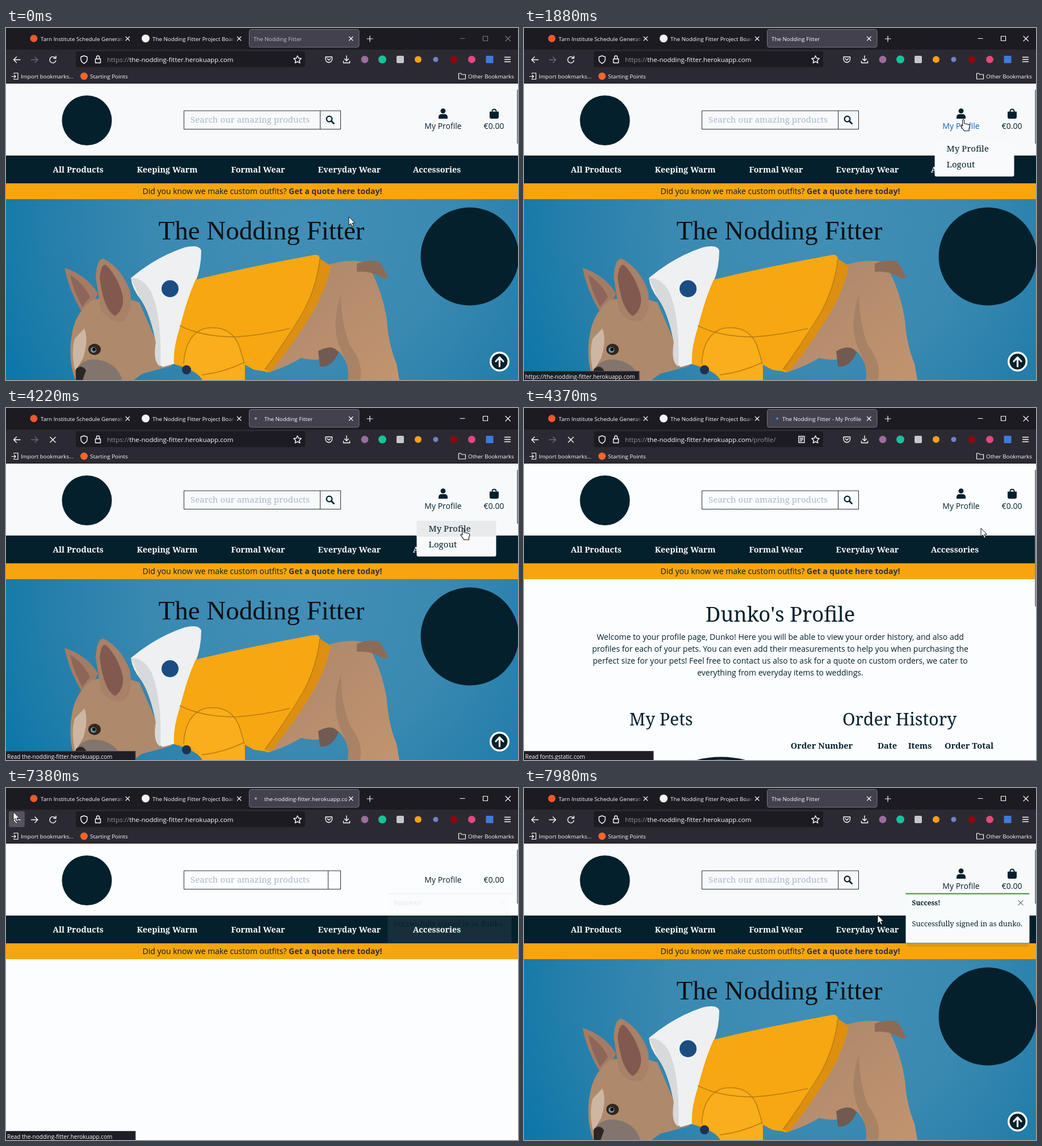
These frames come from a looping animation (902 by 621 pixels, 8000 ms). An HTML page:

```html
<!DOCTYPE html>
<html lang="en">
<head>
<meta charset="utf-8">
<title>Shop visit</title>
<style>
html, body { margin: 0; width: 100%; height: 100%; overflow: hidden; background: #1c1b22; }
svg { display: block; }
text { font: 14px "Open Sans", "Noto Sans", sans-serif; fill: #04202c; white-space: pre; }
.ui text { font-size: 9.8px; fill: #fbfbfe; }
.ui #url { font-size: 11.5px; }
.ui .grey { fill: #92929c; }
.ui #statusText { font-size: 10px; }
.serif text { font-family: "Noto Serif", "Liberation Serif", serif; }
.mid text, text.mid { text-anchor: middle; }
.bold text, .bold { font-weight: 700; }
.line { fill: none; stroke: #fbfbfe; stroke-width: 1.4; stroke-linecap: round; stroke-linejoin: round; }
.thin { stroke-width: 1.2; }
.seam { fill: none; stroke: #bd7c12; stroke-width: 1.5; }
</style>
</head>
<body>
<svg width="902" height="621" viewBox="0 0 902 621">
<defs>
  <radialGradient id="wall" gradientUnits="userSpaceOnUse" cx="520" cy="340" r="590">
    <stop offset="0" stop-color="#428fb6"/><stop offset=".45" stop-color="#3a89b1"/>
    <stop offset=".8" stop-color="#207da9"/><stop offset="1" stop-color="#0a76a9"/>
  </radialGradient>
  <linearGradient id="fur" x1="0" y1="0" x2="1" y2="1">
    <stop offset="0" stop-color="#a9866c"/><stop offset="1" stop-color="#c2946f"/>
  </linearGradient>
  <linearGradient id="fade"><stop offset="0" stop-color="#1c1b22" stop-opacity="0"/><stop offset="1" stop-color="#1c1b22"/></linearGradient>
  <clipPath id="tabClip"><rect x="428" width="173" height="38"/></clipPath>
</defs>

<!-- page -->
<rect id="paper" y="98" width="902" height="523" fill="#f8f9fb"/>
<circle cx="142.5" cy="163" r="44" fill="#04202c"/>
<g fill="none" stroke="#2a3038"><rect x="313.5" y="146" width="276" height="32.5"/><path id="divider" d="M553.5 146v32"/></g>
<g class="serif"><text x="325" y="167" style="font-size:15px;fill:#a9bac8">Search our amazing products</text></g>
<g id="icons" fill="#04202c">
  <circle cx="569.5" cy="160.5" r="4.8" fill="none" stroke="#04202c" stroke-width="2.3"/>
  <path d="M573 164l4.5 4.5" stroke="#04202c" stroke-width="2.8" stroke-linecap="round"/>
  <circle cx="770" cy="146.3" r="4.4"/><path d="M762 160v-2.5q0-5.5 5.5-5.5h5q5.5 0 5.5 5.5v2.5z"/>
  <path d="M852 147.5h16v9.5q0 3-3 3h-10q-3 0-3-3z"/>
  <path d="M856.5 150v-3q0-3.5 3.5-3.5t3.5 3.5v3" fill="none" stroke="#04202c" stroke-width="1.8"/>
</g>
<g id="links" class="mid"><text id="profileLink" x="770" y="178">My Profile</text><text x="859.5" y="178">€0.00</text></g>
<rect y="225" width="902" height="49" fill="#04202c"/>
<g id="nav" class="serif mid bold"></g>
<rect y="274" width="902" height="28" fill="#f7a50e"/>
<text class="mid" x="451.5" y="293">Did you know we make custom outfits? <tspan class="bold" fill="#2b3442">Get a quote here today!</tspan></text>

<g id="hero">
  <rect y="302" width="902" height="319" fill="url(#wall)"/>
  <!-- body -->
  <path d="M560 420Q600 406 632 413L646 434Q664 470 671 515Q674 560 688 592L693 621H602Q607 592 586 570Q556 592 520 582Q490 600 460 608L430 590Z" fill="url(#fur)"/>
  <path d="M590 470Q570 530 592 572Q604 596 602 621H624Q630 590 606 560Q590 520 590 470Z" fill="#98765c" opacity=".5"/>
  <path d="M618 416Q638 407 657 412Q667 424 673 440Q668 445 656 437Q640 428 618 430Z" fill="#8c6b56"/>
  <path d="M550 570Q575 556 586 572Q574 600 553 597Z" fill="#715a52"/>
  <!-- head -->
  <path d="M103 423Q142 436 162 468L150 497L132 498Q110 460 103 423Z" fill="#a47c66"/>
  <path d="M113 435Q138 452 148 475L134 492Q118 462 113 435Z" fill="#8e6659"/>
  <path d="M150 481Q190 468 235 484L268 560L292 596L240 610L225 621H122Q107 580 118 530Q126 500 150 481Z" fill="#ae896c"/>
  <path d="M158 440Q160 406 172 407Q202 422 218 462Q226 500 205 518Q180 520 167 497Z" fill="#a98068"/>
  <path d="M165 440Q168 415 176 418Q198 440 206 474Q208 497 192 508Q172 498 165 440Z" fill="#82594f"/>
  <path d="M138 530Q146 550 136 582L122 606Q114 574 121 548Z" fill="#cdb7a2"/>
  <path d="M122 604Q138 580 165 586Q196 592 205 621H123Z" fill="#83756d"/>
  <path d="M123 602q10-10 18 2l-6 17h-12z" fill="#2c2624"/>
  <ellipse cx="156" cy="567" rx="11" ry="10" fill="#33261f"/><circle cx="154" cy="568" r="5" fill="#6e99a6"/><circle cx="155" cy="567" r="3" fill="#111"/>
  <!-- hood -->
  <path d="M220 441Q264 404 315 387Q341 381 344 393Q344 424 333 450Q318 490 306 530Q295 565 298 592L276 598Q262 590 265 560Q255 505 238 480Q222 460 220 441Z" fill="#eef0f1"/>
  <path d="M220 441Q242 440 256 466Q275 510 272 597Q258 590 264 553Q253 500 235 475Z" fill="#d8d9da"/>
  <circle cx="289" cy="460" r="15" fill="#1c4c82"/>
  <!-- sweater -->
  <path d="M334 444Q420 423 545 400Q552 400 553 407L572 420Q562 470 527 522Q500 565 466 607L437 603L421 594V621H346Q338 605 296 593Q294 565 306 530Q318 480 334 444Z" fill="#f6a712"/>
  <path d="M553 407L572 420Q562 470 527 522Q500 565 466 607L455 602Q500 545 522 505Q548 455 553 407Z" fill="#dc8f10"/>
  <path d="M313 592Q316 541 350 530Q398 522 412 565Q420 590 421 621H346Q336 603 313 592Z" fill="#f9ae1b"/>
  <path class="seam" d="M553 407Q547 460 520 507Q495 548 457 602M313 592Q316 541 350 530Q398 522 412 565L420 592M345 612Q382 608 420 590M306 525Q345 545 405 545Q450 542 500 530"/>
  <circle cx="318" cy="603" r="8" fill="#1c3350"/>
  <text class="mid" x="450" y="373" style="font:47px 'Liberation Serif',serif;fill:#071014">The Nodding Fitter</text>
  <circle cx="817" cy="403" r="86.5" fill="#04202c"/>
  <circle cx="869.5" cy="588.5" r="17.5" fill="#fff"/><circle cx="869.5" cy="588.5" r="14" fill="#04202c"/>
  <path d="M869.5 597v-16m-6.5 7l6.5-7 6.500 7" class="line" style="stroke-width:3.2"/>
</g>

<g id="profile">
  <g class="serif mid">
    <text x="451.5" y="377" style="font-size:36.4px">Dunko's Profile</text>
    <text x="241.5" y="560" style="font-size:30.2px">My Pets</text>
    <text x="661.5" y="560" style="font-size:30.4px">Order History</text>
  </g>
  <g class="mid">
    <text x="451.5" y="409">Welcome to your profile page, Dunko! Here you will be able to view your order history, and also add</text>
    <text x="451.5" y="430">profiles for each of your pets. You can even add their measurements to help you when purchasing the</text>
    <text x="451.5" y="451">perfect size for your pets! Feel free to contact us also to ask for a quote on custom orders, we cater to</text>
    <text x="451.5" y="472">everything from everyday items to weddings.</text>
  </g>
  <g class="serif bold">
    <g id="columns" class="mid"></g>
    <text x="72" y="632" style="font-size:19px">Whisby</text>
  </g>
  <circle cx="347" cy="788" r="170" fill="#e8cf8a" stroke="#04202c" stroke-width="5"/>
</g>

<g id="menu" class="serif">
  <rect x="723.5" y="199" width="140" height="63" rx="3" fill="#f9fafc"/>
  <rect id="menuHover" x="723.5" y="199" width="140" height="28" fill="#e8eaec"/>
  <text x="744.5" y="218" style="font-size:15.1px">My Profile</text><text x="744.5" y="246" style="font-size:15.1px">Logout</text>
</g>

<g id="toast" class="serif">
  <rect x="674" y="190" width="216" height="90" rx="4" fill="#04202c" opacity=".1"/>
  <rect x="672.5" y="186" width="218" height="87.5" fill="#f8fbfc"/>
  <rect x="672.5" y="185.5" width="218" height="2" fill="#14a43c"/>
  <text x="683.5" y="207" style="font-size:11.8px;font-weight:600">Success!</text>
  <text x="683.5" y="244" style="font-size:12.8px">Successfully signed in as dunko.</text>
  <path d="M871 198.5l8 8m0-8l-8 8" class="line" style="stroke:#7d858b"/>
</g>
<rect id="thumb" x="900" y="109" width="2" height="95" fill="#85878b"/>

<!-- browser -->
<g class="ui">
  <rect width="902" height="38" fill="#1c1b22"/><rect y="38" width="902" height="60" fill="#2b2a33"/>
  <rect y="97" width="902" height="1" fill="#111015"/>
  <rect x="428.5" y="2.5" width="193.5" height="31.5" rx="3.5" fill="#42414d" stroke="#74747f"/>
  <circle cx="49" cy="18.5" r="6.5" fill="#f0582a"/><circle cx="246" cy="18.5" r="7" fill="#f4f4f6"/>
  <text x="61" y="22.5">Tarn Institute Schedule Generator</text>
  <rect x="194" y="8" width="14" height="22" fill="url(#fade)"/><rect x="208" y="8" width="24" height="22" fill="#1c1b22"/>
  <text x="258" y="22.5">The Nodding Fitter Project Board</text>
  <rect x="390" y="8" width="14" height="22" fill="url(#fade)"/><rect x="404" y="8" width="20" height="22" fill="#1c1b22"/>
  <g clip-path="url(#tabClip)"><circle id="spinner" cy="18.5" r="2"/><text id="tabTitle" y="22.5"></text></g>
  <path class="line thin" d="M211 15.5l6.5 6.5m0-6.5l-6.5 6.5M407.5 15.5l6.5 6.5m0-6.5l-6.5 6.5M604.5 15.5l6.5 6.5m0-6.5l-6.5 6.5M636 19h10m-5-5v10"/>
  <path id="controls" class="line thin" d="M800 18.5h8M840.5 14.5h8v8h-8zM880 14.5l8.5 8.5m0-8.5l-8.5 8.5"/>

  <rect id="backHover" x="5" y="41" width="28" height="28" rx="3" fill="#54535e"/>
  <rect x="123" y="41" width="404" height="28" rx="3.5" fill="#1c1b22"/>
  <g class="line">
    <path d="M25 56H13.5m5-5l-5 5 5 5"/>
    <path id="forward" d="M44.5 56H56m-5-5l5 5-5 5"/>
    <path id="reload" d="M87 53a5.5 5.5 0 1 0 .8 4.5M88 49.5v4h-4"/>
    <path id="stop" d="M78 51.5l9 9m0-9l-9 9"/>
    <path d="M137.5 49l5.5 2v4q0 5-5.5 7.5q-5.5-2.5-5.5-7.5v-4zM157.5 54.5h9v7h-9zM159.5 54v-2.5a2.5 2.5 0 0 1 5 0v2.5"/>
    <path d="M513.5 49l2 4.3 4.7.5-3.5 3.2 1 4.7-4.2-2.4-4.2 2.4 1-4.7-3.5-3.2 4.7-.5z"/>
    <path id="reader" d="M484 50h10v11h-10zM486.5 53h5m-5 2.5h5m-5 2.5h3"/>
    <path d="M563 51h11.5v4a5.7 5.7 0 0 1-11.5 0zM566 54l2.8 2.7 2.8-2.7M600 49v9m-3.5-3.5l3.5 3.5 3.5-3.5M594.5 58.5v3h11v-3M878.5 51.5h10m-10 4h10m-10 4h10"/>
    <path class="thin" d="M14 80.5v-1h7v11h-7v-1M10 85.5h7m-2.5-2.5l2.5 2.5-2.5 2.5M797.5 80h4l1.5 2h6.5v8h-12z"/>
  </g>
  <text id="url" x="178" y="60"><tspan class="grey">https://</tspan>the-nodding-fitter.herokuapp.com<tspan id="path" class="grey">/profile/</tspan></text>
  <circle cx="632" cy="55.5" r="6.5" fill="#9a6d9c"/><circle cx="663" cy="55.5" r="7" fill="#15c39a"/>
  <rect x="688" y="49" width="13" height="13" rx="2" fill="#c7c7c9"/><circle cx="726" cy="55.5" r="6" fill="#f8a01c"/>
  <circle cx="757" cy="55.5" r="4.5" fill="#7382c4"/><circle cx="789" cy="55.5" r="6.5" fill="#8a0a12"/>
  <circle cx="820.5" cy="55.5" r="6.5" fill="#e5477f"/><rect x="845.5" y="49" width="13" height="13" rx="1" fill="#3f79dc"/>
  <circle cx="137.5" cy="85" r="6.5" fill="#f5652c"/>
  <text x="26" y="89">Import bookmarks...</text><text x="148" y="89">Starting Points</text><text x="814" y="89">Other Bookmarks</text>
  <g id="status"><rect id="statusBox" x="-1" y="605.5" height="17" fill="#1f1e26" stroke="#4a4952"/><text id="statusText" x="2" y="618.5"></text></g>
</g>

<g id="cursor" stroke-linejoin="round">
  <path id="arrow" d="M0 0V15L3.4 11.8 5.9 17.3 8.3 16.2 5.9 11H10.5Z" fill="#fff" stroke="#111"/>
  <path id="hand" d="M-1.5 1.5q1.5-2.5 3 0v6l8 1.7q2 .6 2 2.8l-1.5 5v3.5H1.5l-6-8.5q0-2 3 0z" fill="#fff" stroke="#111" stroke-width="1.1"/>
  <path id="beam" d="M-3-7.5h2.5l.5.5.5-.5H3M0-7V6.5M-3 7h2.5l.5-.5.5.5H3" fill="none" stroke="#222"/>
</g>
</svg>
<script>
const LOOP = 8000, HOST = "the-nodding-fitter.herokuapp.com", SHOP = "The Nodding Fitter";
const $ = id => document.getElementById(id);
const show = (id, on) => $(id).style.display = on ? "" : "none";
const paint = (id, prop, value) => $(id).style[prop] = value;
const labels = (id, list, y, size, fill) => $(id).innerHTML = list.map(([x, s]) =>
  `<text x="${x}" y="${y}" style="font-size:${size}px;fill:${fill}">${s}</text>`).join("");

labels("nav", [[127, "All Products"], [284, "Keeping Warm"], [444, "Formal Wear"],
  [605, "Everyday Wear"], [759, "Accessories"]], 254.5, 14.4, "#fafbfc");
labels("columns", [[524.5, "Order Number"], [640, "Date"], [697.5, "Items"], [784, "Order Total"]], 601, 14.6, "#04202c");

// The screen refreshes in runs of 120 ms steps: [start, steps]
const ticks = [[0, 11], [1350, 1], [1500, 1], [1640, 3], [2270, 6], [3020, 3], [3410, 1], [3560, 2], [3830, 1],
  [3980, 3], [4370, 2], [4640, 7], [5490, 3], [5880, 7], [6740, 4], [7380, 6]]
  .flatMap(([start, n]) => Array.from({ length: n }, (_, i) => start + i * 120));

// Pointer route: [time, x, y]
const route = [[0, 604, 333], [840, 780, 140], [1200, 776, 207], [1350, 801, 168], [1500, 785, 161], [1640, 774, 161],
  [2150, 774, 161], [2870, 832, 180], [3260, 836, 190], [3410, 820, 206], [3680, 807, 212], [4370, 805, 212],
  [4490, 805, 212], [5370, 612, 368], [5730, 462, 368], [5880, 460, 368], [6600, 110, 101], [7100, 14, 43],
  [7380, 13, 42], [7980, 623, 224], [LOOP, 623, 224]];

function pointer(t) {
  const i = route.findIndex(p => p[0] > t);
  const [t0, x0, y0] = route[i - 1], [t1, x1, y1] = route[i];
  const k = (t - t0) / (t1 - t0);
  return [x0 + (x1 - x0) * k, y0 + (y1 - y0) * k];
}

function statusAt(during) {
  if (during(1640, 3260)) return ["https://" + HOST, 204];
  if (during(3830, 3980)) return [`https://${HOST}/profile/`, 243];
  if (during(4370, 4490)) return ["Read fonts.gstatic.com", 229];
  if (during(3980, 4370) || during(7380, 7740)) return ["Read " + HOST, 229];
  return ["", 0];
}

function draw(t) {
  const during = (a, b = LOOP) => t >= a && t < b;
  const profile = during(4370, 7380), bare = during(7380, 7500), back = during(7380);
  const loading = during(3980, 4490) || during(7380, 7740);

  show("profile", profile);
  show("hero", !profile && !bare);
  show("icons", !bare);
  paint("paper", "fill", profile || bare ? "#fcfdff" : "#f8f9fb");
  $("divider").setAttribute("transform", `translate(${bare ? 14 : 0})`);
  $("links").setAttribute("transform", `translate(0 ${bare ? -11 : 0})`);
  paint("profileLink", "fill", during(1350, 3020) ? "#0d62c4" : "#04202c");
  $("thumb").setAttribute("height", profile ? 241 : 95);
  show("menu", during(1640, 4370));
  show("menuHover", during(3410, 4370));
  paint("toast", "opacity", back ? (bare ? .07 : during(7620) ? 1 : .7) : 0);

  $("tabTitle").textContent = bare ? HOST : SHOP + (profile ? " - My Profile" : "");
  $("tabTitle").setAttribute("x", loading ? 455 : 436);
  paint("tabTitle", "fill", during(1640) ? "#fbfbfe" : "#c3c3c9");
  paint("controls", "stroke", during(1640) ? "#fbfbfe" : "#77777f");
  show("spinner", loading);
  $("spinner").setAttribute("cx", profile ? 446 : 440);
  paint("spinner", "fill", profile ? "#3f8ef0" : "#a5a5ae");
  show("stop", during(3980, 4490));
  show("reload", !during(3980, 4490));
  show("path", profile);
  show("reader", profile);
  paint("forward", "stroke", back ? "#fbfbfe" : "#6d6c76");
  show("backHover", during(7100, 7500));

  const [status, width] = statusAt(during);
  show("status", status);
  $("statusText").textContent = status;
  $("statusBox").setAttribute("width", width);

  const [x, y] = pointer(t);
  const hand = during(1350, 2870) || during(3410, 4370);
  const beam = during(5490, 6000);
  $("cursor").setAttribute("transform", `translate(${x} ${y})`);
  show("hand", hand);
  show("beam", beam);
  show("arrow", !hand && !beam);
}

function frame() {
  const now = performance.now() % LOOP;
  draw(ticks.filter(t => t <= now).pop());
  requestAnimationFrame(frame);
}
frame();
</script>
</body>
</html>
```
